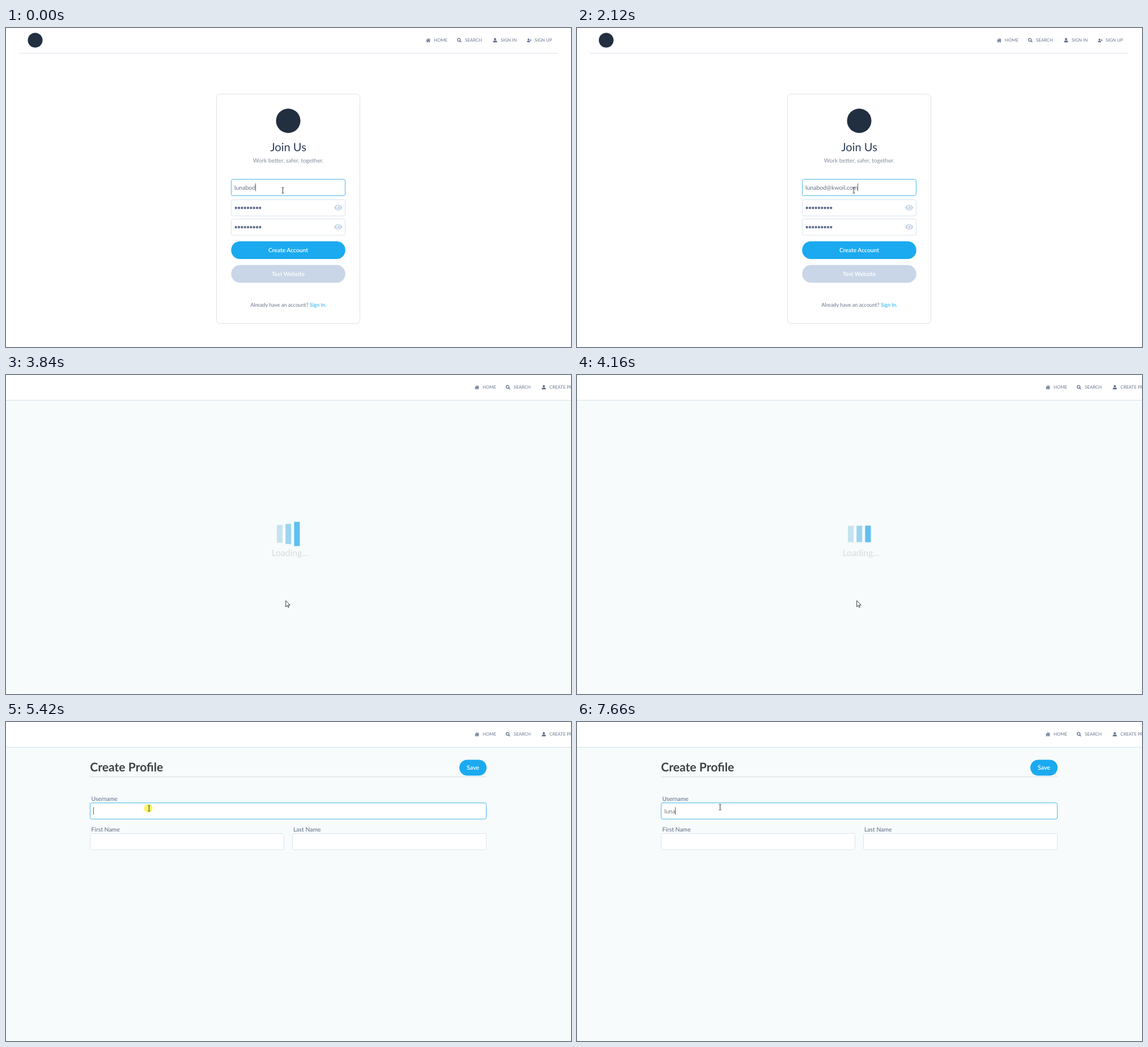
Animation, 997 px wide and 562 px high, one loop 8000 ms. Source, as an HTML page:

```html
<!DOCTYPE html>
<html lang="en">
<head>
<meta charset="utf-8">
<title>Sign up</title>
<style>
  html, body { margin: 0; width: 100%; height: 100%; overflow: hidden; background: #fff; }
  svg { display: block; }
  text { font-family: Lato, "Open Sans", sans-serif; text-rendering: geometricPrecision; white-space: pre; }
</style>
</head>
<body>
<svg id="stage" width="997" height="562" viewBox="0 0 997 562"></svg>
<script>
const LOOP = 8000;
const BLUE = '#1baaef', NAVY = '#212f40', SLATE = '#5d6c8b', LINE = '#dbe3ef', FOCUS = '#4cb7ea';
const stage = document.getElementById('stage');

function add(parent, tag, attrs = {}, content) {
  const el = document.createElementNS('http://www.w3.org/2000/svg', tag);
  for (const key in attrs) el.setAttribute(key, attrs[key]);
  if (content !== undefined) el.textContent = content;
  parent.appendChild(el);
  return el;
}
const group = (parent, x = 0, y = 0) => add(parent, 'g', { transform: `translate(${x} ${y})` });
const box = (parent, x, y, width, height, rx, fill, stroke = 'none') =>
  add(parent, 'rect', { x, y, width, height, rx, fill, stroke });
const label = (parent, str, x, y, size, fill, more = {}) =>
  add(parent, 'text', { x, y, 'font-size': size, fill, ...more }, str);
const field = (parent, x, y, width, height) => box(parent, x, y, width, height, 3, '#fff', LINE);
const MID = { 'text-anchor': 'middle' };
const BOLD_MID = { 'text-anchor': 'middle', 'font-weight': 600 };

// Navigation
const USER = 'M4 0a2 2 0 0 1 0 4a2 2 0 0 1 0-4zM.4 7.6V6.7q0-2.1 2-2.1h3.2q2 0 2 2.1v.9z';
const icons = {
  home: g => add(g, 'path', { d: 'M4 .6 0 4.1l.6.6L4 1.8l3.4 2.9.6-.6-1.2-1V1H5.7v1zM4 2.6 1.2 5v2.6h2.1V5.4h1.4v2.2h2.1V5z' }),
  search: g => add(g, 'path', { d: 'M5.2 5.2 7.4 7.4M3.2.7a2.5 2.5 0 0 1 0 5a2.5 2.5 0 0 1 0-5z', fill: 'none', stroke: SLATE, 'stroke-width': 1.3 }),
  user: g => add(g, 'path', { d: USER }),
  join: g => {
    add(g, 'path', { d: USER, transform: 'translate(0 .8) scale(.75 .85)' });
    add(g, 'path', { d: 'M6.8 2.2v3M5.3 3.7h3', stroke: SLATE });
  }
};
function nav(parent, items) {
  for (const [icon, x, str] of items) {
    const g = group(parent, x, 17.7);
    g.setAttribute('fill', SLATE);
    icons[icon](g);
    label(parent, str, x + 14, 24.3, 7.8, '#66748f');
  }
}

// Sign-up page
const signup = group(stage);
add(signup, 'circle', { cx: 51.5, cy: 21.5, r: 13, fill: NAVY });
nav(signup, [['home', 741, 'HOME'], ['search', 796, 'SEARCH'], ['user', 859, 'SIGN IN'], ['join', 919, 'SIGN UP']]);
box(signup, 23, 44, 950, 1, 0, '#dee1ec');
box(signup, 371.5, 116.5, 253, 404, 6, '#fff', '#dde1e9');
add(signup, 'circle', { cx: 498, cy: 163.5, r: 21.5, fill: NAVY });
label(signup, 'Join Us', 498, 217, 20.1, '#2c3d59', MID);
label(signup, 'Work better, safer, together.', 498, 237, 10.1, '#828d9e', MID);
const emailBox = field(signup, 397.5, 266.5, 201, 29);
for (const y of [302.5, 336.5]) {
  field(signup, 397.5, y, 201, 28.5);
  const mid = y + 14.5;
  for (let i = 0; i < 9; i++)
    add(signup, 'circle', { cx: 405.7 + i * 5.33, cy: mid, r: 2.15, fill: SLATE });
  const eye = group(signup, 586.2, mid - 0.4);
  eye.setAttribute('fill', '#c4d2e5');
  add(eye, 'path', { d: 'M-7.2 0Q-4.4-5 0-5T7.2 0Q4.4 5 0 5T-7.2 0z' });
  add(eye, 'circle', { r: 3.7, fill: '#fff' });
  add(eye, 'circle', { r: 2.5 });
  add(eye, 'circle', { cx: -1.2, cy: -1.2, r: 1.1, fill: '#fff' });
}
box(signup, 397.3, 375.8, 201.5, 31.2, 15.6, BLUE);
label(signup, 'Create Account', 498, 395, 10.3, '#fff', BOLD_MID);
box(signup, 397.3, 417.6, 201.5, 31.2, 15.6, '#c9d6e7');
label(signup, 'Test Website', 498, 437, 10.2, '#fff', BOLD_MID);
const footer = label(signup, 'Already have an account? ', 498.3, 490.7, 9.2, '#677388', MID);
add(footer, 'tspan', { fill: BLUE }, 'Sign In.');

// Signed-in frame, loader and profile form
const member = group(stage);
box(member, 0, 44, 997, 517, 0, '#f7fbfc');
box(member, 0, 44, 997, 1, 0, '#d6e1ed');
nav(member, [['home', 827, 'HOME'], ['search', 882, 'SEARCH'], ['user', 945, 'CREATE PROFILE']]);

const loader = group(member);
const bars = ['#c5e3ef', '#9dd4ed', '#5fc0ef'].map((fill, i) => box(loader, 478 + i * 15.2, 264, 10, 30, 0, fill));
label(loader, 'Loading...', 501, 319, 15.8, '#d9dbdf', MID);

const profile = group(member);
label(profile, 'Create Profile', 148.3, 87, 21.1, '#3d4145', { 'font-weight': 700 });
box(profile, 148, 96, 700, 1, 0, '#dadfe4');
box(profile, 800, 66.5, 48, 28, 14, BLUE);
label(profile, 'Save', 824, 84, 10.7, '#fff', BOLD_MID);
label(profile, 'Username', 150.5, 138.5, 10.45, '#5f6c83');
label(profile, 'First Name', 150.5, 192.5, 10.45, '#5f6c83');
label(profile, 'Last Name', 507, 192.5, 10.45, '#5f6c83');
const nameBox = field(profile, 148.5, 142.5, 699, 28.5);
field(profile, 148.5, 196.5, 342, 28.5);
field(profile, 505.5, 196.5, 342, 28.5);

// Typed inputs: keys are [time, characters shown], blinks are [from, to]
function typed(parent, str, x, y, fill, keys, blinks) {
  const text = label(parent, '', x, y, 10.5, fill);
  const caret = box(parent, x, y - 10.7, 1, 13.5, 0, '#5c636f');
  return t => {
    text.textContent = str.slice(0, last(keys, t)[1]);
    caret.setAttribute('x', Math.round(x + text.getComputedTextLength()));
    show(caret, blinks.some(([from, to]) => t >= from && t < to));
  };
}
const last = (rows, t) => rows.reduce((hit, row) => row[0] <= t ? row : hit);
const show = (el, on) => el.setAttribute('visibility', on ? 'inherit' : 'hidden');

const emailTimes = [0, 600, 930, 1060, 1260, 1450, 1590, 1780, 1920, 2020, 2120];
const email = typed(signup, 'lunabod@kwoil.com', 403, 284.5, '#667389',
  emailTimes.map((t, i) => [t, 7 + i]), [[0, 270], [600, 2650]]);
const nameTimes = [0, 7070, 7260, 7530, 7660];
const username = typed(profile, 'luna', 154, 160.7, '#73787f',
  nameTimes.map((t, i) => [t, i]), [[5420, 5940], [6470, 7000], [7070, LOOP]]);

// Pointer
const glow = add(stage, 'circle', { r: 7.5, fill: '#fdf04a', 'fill-opacity': 0.85 });
const pointer = group(stage);
const shape = (d, fill, width) =>
  add(pointer, 'path', { d, fill, stroke: '#20242a', 'stroke-width': width, 'stroke-linejoin': 'round' });
const shapes = {
  beam: shape('M-2-5H-.5L0-4.5.5-5H2M0-4.5V4.5M-2 5H-.5L0 4.5.5 5H2', 'none', 0.9),
  arrow: shape('M0 0v10.8l2.5-2.3 1.7 3.5 1.6-.7-1.6-3.5h3.3z', '#fff', 0.9),
  hand: shape('M-1.1 8.2V1.2a1.1 1.1 0 0 1 2.2 0V5.2l4 .9q1 .3 1 1.4v2.3q0 1.4-.8 2.6V13.6H-1.2v-1.2L-4.2 8.8q-.6-1 .3-1.5t1.6.3z', '#fff', 0.9)
};
const moves = [
  [0, 488.5, 286, 'beam'],
  [2720, 488.5, 292, 'beam'],
  [2790, 489, 308, 'beam'],
  [2850, 491, 338, 'beam'],
  [2920, 493, 367, 'arrow'],
  [2990, 494.3, 389, 'hand'],
  [3050, 494.5, 397.5, 'hand'],
  [3840, 493.7, 397.5, 'arrow'],
  [4760, 457.7, 354.3, 'arrow'],
  [4830, 370, 257, 'arrow'],
  [4900, 284, 178, 'arrow'],
  [4960, 262, 161, 'beam'],
  [5030, 255, 155, 'beam'],
  [5100, 253, 153, 'beam'],
  [5220, 252.5, 152, 'beam'],
  [5680, 252.5, 150, 'beam']
];
const clicks = [[3110, 3240], [5420, 5680]];

function drawPointer(t) {
  const [, x, y, kind] = last(moves, t);
  pointer.setAttribute('transform', `translate(${x} ${y})`);
  for (const name in shapes) show(shapes[name], name === kind);
  glow.setAttribute('cx', x - 1.5);
  glow.setAttribute('cy', y);
  show(glow, clicks.some(([from, to]) => t >= from && t < to));
}

function drawBars(t) {
  bars.forEach((bar, i) => {
    const phase = ((t - 3790) / 1000 + (2 - i) * 0.1) % 1;
    const rest = Math.max(0, 1 - phase * 2);
    const height = 29 + 19 * rest ** 3;
    bar.setAttribute('y', 280 - height / 2);
    bar.setAttribute('height', height);
  });
}

function draw(t) {
  const joined = t >= 3840, loaded = t >= 4230;
  show(signup, !joined);
  show(member, joined);
  show(loader, joined && !loaded);
  show(profile, loaded);
  emailBox.setAttribute('stroke', t < 3110 ? FOCUS : LINE);
  nameBox.setAttribute('stroke', t >= 5420 ? FOCUS : LINE);
  email(t);
  username(t);
  drawBars(Math.max(t, 3840));
  drawPointer(t);
}

const start = performance.now();
function tick() {
  draw((performance.now() - start) % LOOP);
  requestAnimationFrame(tick);
}
tick();
</script>
</body>
</html>
```
